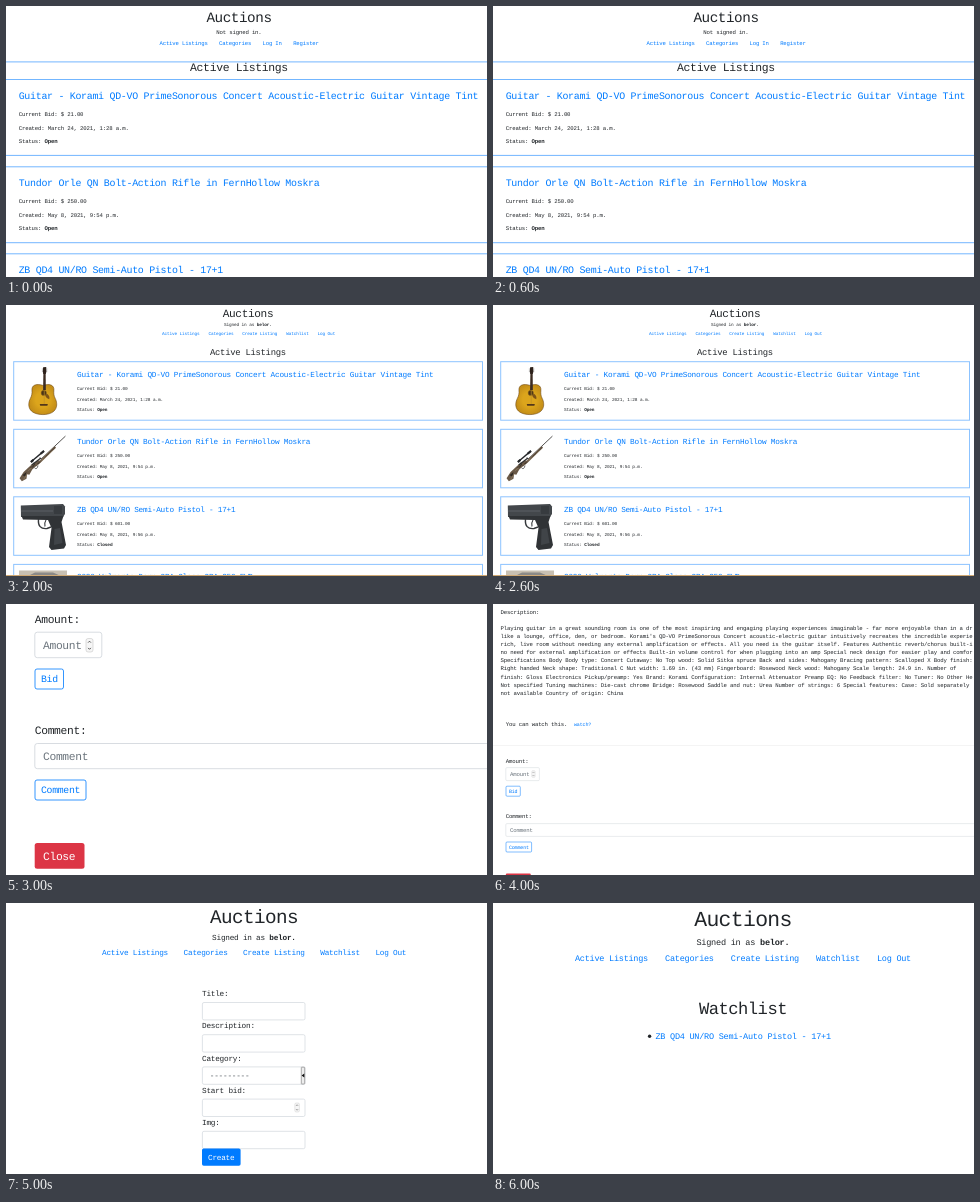
Animation of 481 by 271 pixels, one loop 7 s. Source, as an HTML page:

```html
<!DOCTYPE html>
<html lang="en">
<head>
<meta charset="utf-8">
<title>Auctions</title>
<style>
  html, body { margin: 0; width: 100%; height: 100%; overflow: hidden; background: #fff; }
  svg { display: block; width: 481px; height: 271px; overflow: hidden; }
  text { font-family: "Liberation Mono", "Courier New", monospace; letter-spacing: -.03em;
         white-space: pre; text-rendering: geometricPrecision; }
  .b { font-weight: bold; }
</style>
</head>
<body>
<svg id="stage" viewBox="0 0 481 271" xmlns="http://www.w3.org/2000/svg"></svg>
<script>
const INK = '#212529', BLUE = '#007bff', GREY = '#6c757d', EDGE = '#ced4da', RED = '#dc3545';
const SCENE_MS = 1000;
const USER = 'belor';
const GUITAR = 'Guitar - Korami QD-VO PrimeSonorous Concert Acoustic-Electric Guitar Vintage Tint';
const RIFLE = 'Tundor Orle QN Bolt-Action Rifle in FernHollow Moskra';
const PISTOL = 'ZB QD4 UN/RO Semi-Auto Pistol - 17+1';
const CAR = '2020 Velmarto-Dorn QRA-Class QRA 250 FWD';
const MENU = ['Active Listings', 'Categories', 'Create Listing', 'Watchlist', 'Log Out'];
const GUEST_MENU = ['Active Listings', 'Categories', 'Log In', 'Register'];

// adv is the width of one character cell
const text = (x, y, s, adv, fill = INK) =>
  `<text x="${x}" y="${y - adv * .05}" font-size="${adv / .57}" fill="${fill}">${s}</text>`;
const centred = (cx, y, s, adv) => text(cx - s.length * adv / 2, y, s, adv);
const bold = s => `<tspan class="b">${s}</tspan>`;
const rect = (x, y, w, h, fill, stroke = 'none', r = 0, extra = '') =>
  `<rect x="${x}" y="${y}" width="${w}" height="${h}" rx="${r}" fill="${fill}" stroke="${stroke}" ${extra}/>`;
const path = (d, fill, stroke = 'none', w = 1) =>
  `<path d="${d}" fill="${fill}" stroke="${stroke}" stroke-width="${w}"/>`;
const card = (x, y, w, h, alpha) => rect(x, y, w, h, 'none', BLUE, 0, `stroke-opacity="${alpha}"`);
// line is the border weight, which follows the page zoom
const field = (x, y, w, h, r, line) => rect(x, y, w, h, '#fff', EDGE, r, `stroke-width="${line}"`);
const button = (x, y, w, h, r, line) => rect(x, y, w, h, '#fff', BLUE, r, `stroke-width="${line}"`);

function nav(x, y, adv, items) {
  return items.map(s => {
    const item = text(x, y, s, adv, BLUE);
    x += (s.length + 3.5) * adv;
    return item;
  }).join('');
}

function signedIn(cx, y, adv) {
  return text(cx - 9.5 * adv, y, `Signed in as ${bold(USER + '.')}`, adv);
}

function listing(x, y, title, titleAdv, adv, rows, bid, date, status = 'Open') {
  return text(x, y, title, titleAdv, BLUE) +
    text(x, y + rows[0], `Current Bid: $ ${bid}`, adv) +
    text(x, y + rows[1], `Created: ${date}`, adv) +
    text(x, y + rows[2], `Status: ${bold(status)}`, adv);
}
const guitarRow = (x, y, ta, a, rows) =>
  listing(x, y, GUITAR, ta, a, rows, '21.00', 'March 24, 2021, 1:28 a.m.');
const rifleRow = (x, y, ta, a, rows) =>
  listing(x, y, RIFLE, ta, a, rows, '250.00', 'May 8, 2021, 9:54 p.m.');

function spinner(x, y, w, h) {
  const c = x + w / 2, u = w * .2;
  const arrow = (my, d) => path(`M${c - u} ${my + d * u}L${c} ${my}L${c + u} ${my + d * u}`, 'none', '#444', w * .13);
  return rect(x, y, w, h, '#f6f6f6', '#bbb', w * .3, `stroke-width="${w * .07}"`) +
    arrow(y + h * .2, 1) + arrow(y + h * .8, -1);
}

// Pictures, drawn at the size of the large listing
const guitarPic =
  path('M56 74C43 70 36 74 36.5 82C37 89 36 92 33.5 97C28.5 107 29 124 55.5 124.5C81 124 82 107 77 97C74.5 92 74 89 74.5 82C75 74 68 70 56 74Z', 'url(#wood)', '#6b4512', 1) +
  '<circle cx="57" cy="87" r="4.6" fill="#4a3215" stroke="#94701f" stroke-width=".8"/>' +
  path('M62 88Q68 92 66.5 98Q61.5 97 59.5 92Z', '#7d5318') +
  path('M56.3 52H60.2L60.6 82H55.8Z', '#3b2b22') +
  path('M55.8 42.5L61.2 42L61.7 50L60.3 54H56.2L55.2 50Z', '#2d211b') +
  path('M54.5 44V51M62.4 44V51', 'none', '#999', .7) +
  path('M57.8 83V107', 'none', '#c0922a', 1.2) +
  path('M50 106.3H64L63.2 109H50.8Z', '#53371a');

const riflePic =
  path('M94.5 162L52 202', 'none', '#3a3836', 1.5) +
  path('M77 181L51 206L43 213', 'none', '#75634f', 3.6) +
  path('M77 181L56 201', 'none', '#42382f', 1.4) +
  path('M48 204L53 206L37 220L32 229L28 228L27 236L19 240L15 235L22 224L36 211Z', '#6a5947') +
  path('M20 230L27 224L25 232ZM33 217L41 211L38 217ZM45 210L51 206L48 210Z', '#302a24') +
  path('M22 237L28 228M30 222L38 215M54 204L60 198M66 193L72 187', 'none', '#9a876a', 1) +
  path('M35 206.5L57 188', 'none', '#25272a', 2.4) +
  path('M34.5 207L39 203.3M51.5 192.5L57.5 187.5', 'none', '#25272a', 3.8) +
  path('M36 212L52 200', 'none', '#2e2e2e', 2.2) +
  path('M41 217Q45 221 47 213M39 208L42 213M50 199L52 202', 'none', '#2b2b2b', 1.2);

const pistolPic =
  path('M14.8 200.5L57 199L59 201.5V209L57 212L15 212Z', '#43474b') +
  path('M15.5 211H57.5L55.5 217L60 240L58 243.5L45.5 245L43 242L45.5 223L42 215L17 214.5Z', '#303336') +
  path('M32.5 214Q31.5 224.5 41 223.5L45 222', 'none', '#35383b', 1.4) +
  path('M40 215Q38 218 39 221.5', 'none', '#35383b', 1.1) +
  path('M49 201V209M51 201V209M53 201V209M55 201V209', 'none', '#25282b', .7) +
  path('M15 206H47', 'none', '#666b70', .7) +
  path('M48.5 224L54 223L56.5 238L48 240Z', '#404448');

const place = (pic, from, to, s) =>
  `<g transform="translate(7.5 ${to}) scale(${s}) translate(-4.5 ${-from})">${pic}</g>`;

function guestHome() {
  const rows = [17, 31, 44.5];
  return centred(233, 16, 'Auctions', 8.15) + centred(233, 28, 'Not signed in.', 3.24) +
    nav(153.5, 39, 3.22, GUEST_MENU) + centred(233, 65, 'Active Listings', 6.52) +
    [-20, 73.5, 160.8, 247.8].map(y => card(-3, y, 490, 75.9, .55)).join('') +
    guitarRow(12.7, 93, 5.68, 3.24, rows) + rifleRow(12.7, 180, 5.68, 3.24, rows) +
    text(12.7, 267, PISTOL, 5.68, BLUE);
}

function largeListings() {
  const rows = [22.5, 41.5, 60];
  return centred(411, 20.5, 'Active Listings', 8.8) +
    [32.5, 150.1, 267.5].map(y => card(4.5, y, 500, 101.4, .65)).join('') +
    guitarPic + riflePic +
    guitarRow(114, 58.3, 7.67, 4.41, rows) + rifleRow(114, 175.3, 7.67, 4.41, rows);
}

function memberHome() {
  const rows = [13, 23.7, 34.3];
  return centred(242, 12, 'Auctions', 6.33) + signedIn(242, 21.3, 2.53) +
    nav(156, 29.7, 2.51, MENU) + centred(242, 50, 'Active Listings', 5.07) +
    [56.7, 124.3, 191.8, 259.4].map(y => card(7.7, y, 468.8, 58.5, .45)).join('') +
    place(guitarPic, 32.5, 56.5, .577) + place(riflePic, 150.5, 124.5, .577) + pistolPic +
    rect(13, 265.5, 48, 6, '#c8c0b2') + path('M22 271L29 267.5H47L55 271Z', '#8b8a88') +
    guitarRow(71, 72, 4.41, 2.54, rows) + rifleRow(71, 139.3, 4.41, 2.54, rows) +
    listing(71, 207, PISTOL, 4.41, 2.54, rows, '601.00', 'May 8, 2021, 9:56 p.m.', 'Closed') +
    text(71, 274, CAR, 4.41, BLUE) + rect(0, 270, 481, 1, '#cfa873');
}

function bidForm() {
  return text(28.8, 19, 'Amount:', 6.45) + field(28.8, 28.2, 67, 25.5, 2.5, .8) +
    text(37, 45.5, 'Amount', 6.45, GREY) + spinner(80, 34.5, 7, 13.5) +
    button(29, 65, 28.5, 20, 2, .8) + text(35, 78.6, 'Bid', 5.6, BLUE) +
    text(28.8, 130, 'Comment:', 6.45) + field(28.8, 139.5, 480, 25.2, 2.5, .8) +
    text(37, 156.7, 'Comment', 6.45, GREY) +
    button(29, 176, 51, 20, 2, .8) + text(35, 189.6, 'Comment', 5.6, BLUE) +
    rect(28.7, 239, 49.8, 25.8, RED, 'none', 2.5) + text(37, 256.3, 'Close', 6.45, '#fff');
}

function details() {
  const a = 3.243;
  const lines = [
    'Playing guitar in a great sounding room is one of the most inspiring and engaging playing experiences imaginable - far more enjoyable than in a dr',
    "like a lounge, office, den, or bedroom. Korami's QD-VO PrimeSonorous Concert acoustic-electric guitar intuitively recreates the incredible experie",
    'rich, live room without needing any external amplification or effects. All you need is the guitar itself. Features Authentic reverb/chorus built-i',
    'no need for external amplification or effects Built-in volume control for when plugging into an amp Special neck design for easier play and comfor',
    'Specifications Body Body type: Concert Cutaway: No Top wood: Solid Sitka spruce Back and sides: Mahogany Bracing pattern: Scalloped X Body finish:',
    'Right handed Neck shape: Traditional C Nut width: 1.69 in. (43 mm) Fingerboard: Rosewood Neck wood: Mahogany Scale length: 24.9 in. Number of',
    'finish: Gloss Electronics Pickup/preamp: Yes Brand: Korami Configuration: Internal Attenuator Preamp EQ: No Feedback filter: No Tuner: No Other He',
    'Not specified Tuning machines: Die-cast chrome Bridge: Rosewood Saddle and nut: Urea Number of strings: 6 Special features: Case: Sold separately',
    'not available Country of origin: China'
  ];
  return text(7.5, 10, 'Description:', a) +
    lines.map((s, i) => text(7.5, 26 + i * 8.13, s, a)).join('') +
    text(12.8, 122, 'You can watch this.', a) + text(81, 122.2, 'watch?', 2.85, BLUE) +
    rect(0, 141, 481, .5, '#e8e8e8') +
    text(12.8, 158.7, 'Amount:', a) + field(12.8, 163.6, 33.6, 13, 1.2, .45) +
    text(17, 172.2, 'Amount', a, GREY) + spinner(38.7, 166.6, 3.5, 6.8) +
    button(13, 182.2, 14.3, 10, 1, .5) + text(15.9, 189.1, 'Bid', 2.85, BLUE) +
    text(12.8, 214.6, 'Comment:', a) + field(12.8, 219.6, 490, 12.8, 1.2, .45) +
    text(17, 228.1, 'Comment', a, GREY) +
    button(13, 238, 25.6, 10, 1, .5) + text(15.9, 244.9, 'Comment', 2.85, BLUE) +
    rect(12.8, 269.6, 25, 13, RED, 'none', 1.2);
}

function createForm() {
  const a = 4.41;
  const labels = ['Title:', 'Description:', 'Category:', 'Start bid:', 'Img:'];
  return centred(248, 20.5, 'Auctions', 11) + signedIn(248, 37, a) + nav(96, 52, a, MENU) +
    labels.map((s, i) => text(196, 93.4 + i * 32.2, s, a) +
      field(196.4, 99.5 + i * 32.2, 102.6, 17.4, 1.6, .65)).join('') +
    text(203.8, 175, '---------', a, '#495057') +
    rect(295.3, 164.2, 3.4, 16.8, '#ededed', '#888', .5, 'stroke-width=".7"') +
    path('M298.3 170.6V174.4L295.6 172.5Z', '#111') +
    spinner(288.8, 200, 4.6, 9) +
    rect(196, 245.4, 38.6, 17.4, BLUE, 'none', 1.7) + text(202, 257, 'Create', a, '#fff');
}

function watchlist() {
  return centred(250, 23.7, 'Auctions', 12.2) + signedIn(250, 42, 4.9) +
    nav(82, 58.7, 4.87, MENU) + centred(250, 111, 'Watchlist', 9.78) +
    `<circle cx="156.6" cy="133.2" r="1.7" fill="${INK}"/>` +
    text(162.4, 136, PISTOL, 4.88, BLUE);
}

const scenes = [guestHome, largeListings, memberHome, bidForm, details, createForm, watchlist];
const stage = document.getElementById('stage');
stage.innerHTML =
  '<defs><radialGradient id="wood"><stop offset=".5" stop-color="#dca51c"/>' +
  '<stop offset="1" stop-color="#c58f18"/></radialGradient></defs>' +
  scenes.map(draw => `<g class="scene" visibility="hidden">${draw()}</g>`).join('');
const groups = [...stage.querySelectorAll('.scene')];

function show(ms) {
  const now = Math.floor(ms / SCENE_MS) % groups.length;
  groups.forEach((g, i) => g.setAttribute('visibility', i === now ? 'visible' : 'hidden'));
}

const start = performance.now();
function tick() {
  show(performance.now() - start);
  requestAnimationFrame(tick);
}
tick();
</script>
</body>
</html>
```
